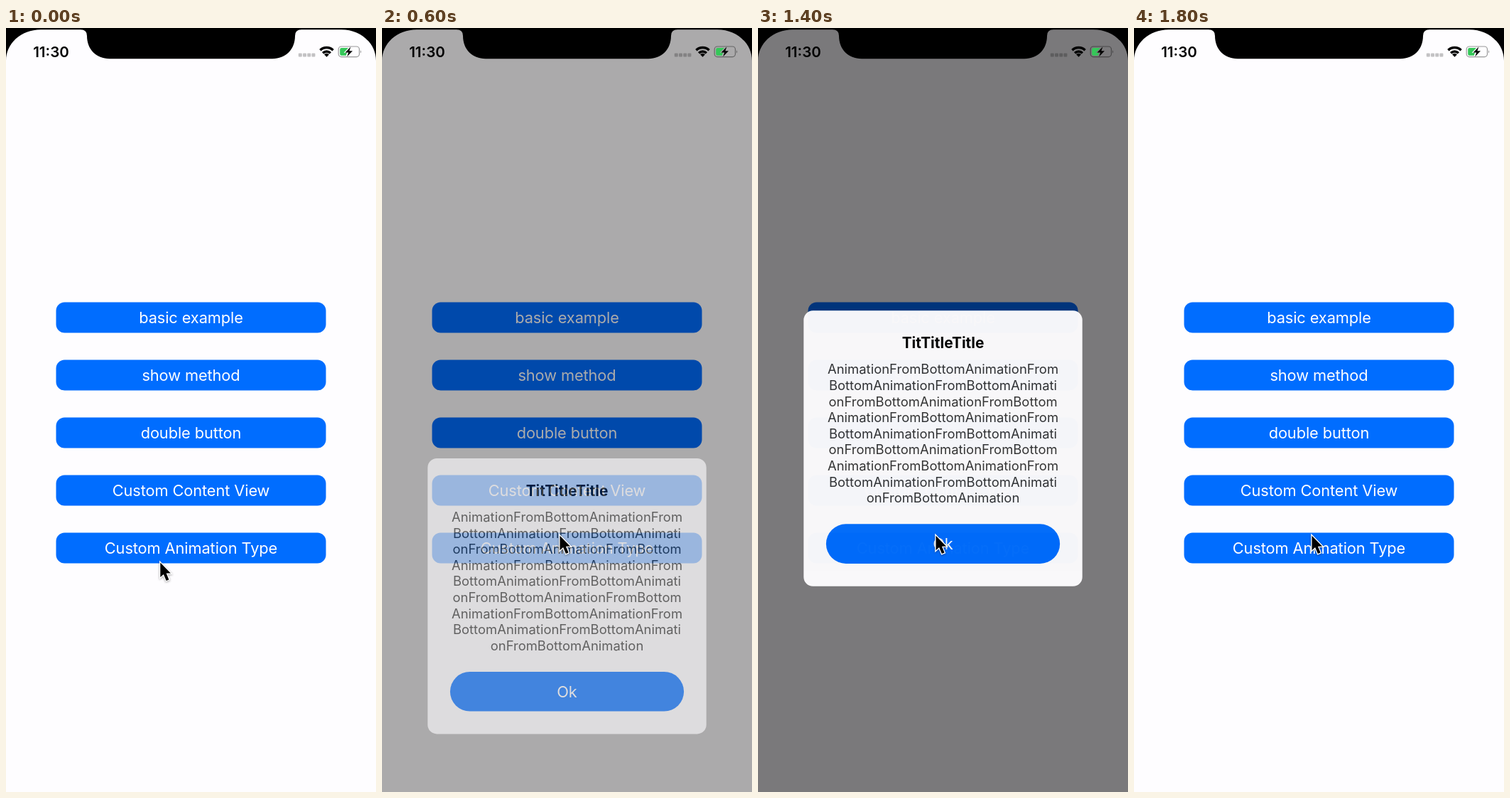
Write an HTML page that moves like this. It is 521x1074 px and loops after 1.9 s.

```html
<!DOCTYPE html>
<html lang="en">
<head>
<meta charset="utf-8">
<title>Popup animation</title>
<style>
  html, body { margin: 0; width: 100%; height: 100%; overflow: hidden; background: #fefdff; }
  svg { display: block; }
  text { font-family: Inter, "Open Sans", sans-serif; text-anchor: middle; }
  .btn rect { fill: #006dff; }
  .btn text { fill: #fff; font-size: 21.8px; letter-spacing: -.1px; }
  .title { font-size: 20.9px; font-weight: 700; }
  .body { fill: #333; font-size: 18.4px; letter-spacing: .04px; }
  .time { font-size: 20.6px; font-weight: 600; }
  .cursor { filter: drop-shadow(0 1.5px 1.5px rgba(0, 0, 0, .35)); }
</style>
</head>
<body>
<svg width="521" height="1074" viewBox="0 0 521 1074">
  <g id="menu" class="btn"></g>

  <rect id="dim" width="521" height="1074" fill="#020002" opacity="0"/>
  <g id="card" opacity="0">
    <rect x="64.3" y="375.2" width="392.4" height="387.4" rx="13" fill="#fefdff"/>
    <text class="title" x="260.5" y="428">TitTitleTitle</text>
    <g id="body" class="body"></g>
    <g class="btn">
      <rect x="95.9" y="675.2" width="329.2" height="55.6" rx="27.8"/>
      <text x="260.5" y="711.2">Ok</text>
    </g>
  </g>

  <!-- bezel and notch -->
  <path d="M0 0H521V46C521 22 500 2.3 472 2.3H416Q407 2.3 407 11C407 30 394 43.2 375 43.2H146C127 43.2 114 30 114 11Q114 2.3 105 2.3H49C21 2.3 0 22 0 46Z"/>
  <text class="time" x="63.5" y="40.6">11:30</text>
  <!-- signal -->
  <g fill="#000" fill-opacity=".23">
    <rect x="411.8" y="35.5" width="5" height="5" rx="1"/>
    <rect x="418" y="35.5" width="5" height="5" rx="1"/>
    <rect x="424.2" y="35.5" width="5" height="5" rx="1"/>
    <rect x="430.4" y="35.5" width="5" height="5" rx="1"/>
  </g>
  <!-- wifi -->
  <g fill="none" stroke="#000" stroke-width="3.4">
    <path d="M442.4 31.2A13 13 0 0 1 460.6 31.2"/>
    <path d="M446.1 35.2A7.7 7.7 0 0 1 456.9 35.2"/>
  </g>
  <path d="M451.5 40.8L448.1 37.3A4.7 4.7 0 0 1 454.9 37.3Z"/>
  <!-- battery -->
  <rect x="468.2" y="26" width="29.3" height="14.6" rx="4" fill="none" stroke="#000" stroke-opacity=".4" stroke-width="1.2"/>
  <path d="M499.2 31.2Q501.2 33.3 499.2 35.4Z" fill-opacity=".45"/>
  <path d="M472.4 28H482L475.6 34.8H480L478.8 38.7H472.4Q470.2 38.7 470.2 36.5V30.2Q470.2 28 472.4 28Z" fill="#35c759"/>
  <path d="M485.4 26.6L477.6 34.4H482.2L480.2 40.2L488 32.2H483.4Z"/>
  <!-- pointer -->
  <g id="cursor" class="cursor">
    <path d="M0 0V20.5L4.6 16.3L8.4 25.3L12.1 23.8L8.4 15H14.6Z" stroke="#fff" stroke-width="2.6" paint-order="stroke"/>
  </g>
</svg>

<script>
  const LOOP = 1900, STEP = 100, FADE = 300, DROP = 588;
  const $ = id => document.getElementById(id);
  const [menu, dim, card, body, cursor] = ['menu', 'dim', 'card', 'body', 'cursor'].map($);

  const label = (text, y) => `<text x="260.5" y="${y}">${text}</text>`;

  const items = ['basic example', 'show method', 'double button', 'Custom Content View', 'Custom Animation Type'];
  menu.innerHTML = items.map((name, i) => {
    const y = 385.4 + 81 * i;
    return `<rect x="70.5" y="${y}" width="380" height="43" rx="12"/>` + label(name, y + 29.7);
  }).join('');

  const verse = [
    'AnimationFromBottomAnimationFrom',
    'BottomAnimationFromBottomAnimati',
    'onFromBottomAnimationFromBottom'
  ];
  const lines = [...verse, ...verse, verse[0], verse[1], 'onFromBottomAnimation'];
  body.innerHTML = lines.map((line, i) => label(line, 464.1 + 22.65 * i)).join('');

  // Smooth 0..1 ramp beginning at start and lasting span ms
  const ramp = (t, start, span) => {
    const x = Math.min(1, Math.max(0, (t - start) / span));
    return x * x * (3 - 2 * x);
  };

  function draw() {
    const t = Math.floor(performance.now() % LOOP / STEP) * STEP;

    const shown = ramp(t, 428, FADE) - ramp(t, 1365, FADE);
    dim.setAttribute('opacity', shown * .543);
    card.setAttribute('opacity', shown);
    card.setAttribute('transform', `translate(0 ${(1 - shown) * DROP})`);

    const move = ramp(t, 0, 400);
    cursor.setAttribute('transform', `translate(${217.3 + 33.2 * move} ${751.6 - 37.8 * move})`);

    requestAnimationFrame(draw);
  }
  draw();
</script>
</body>
</html>
```
